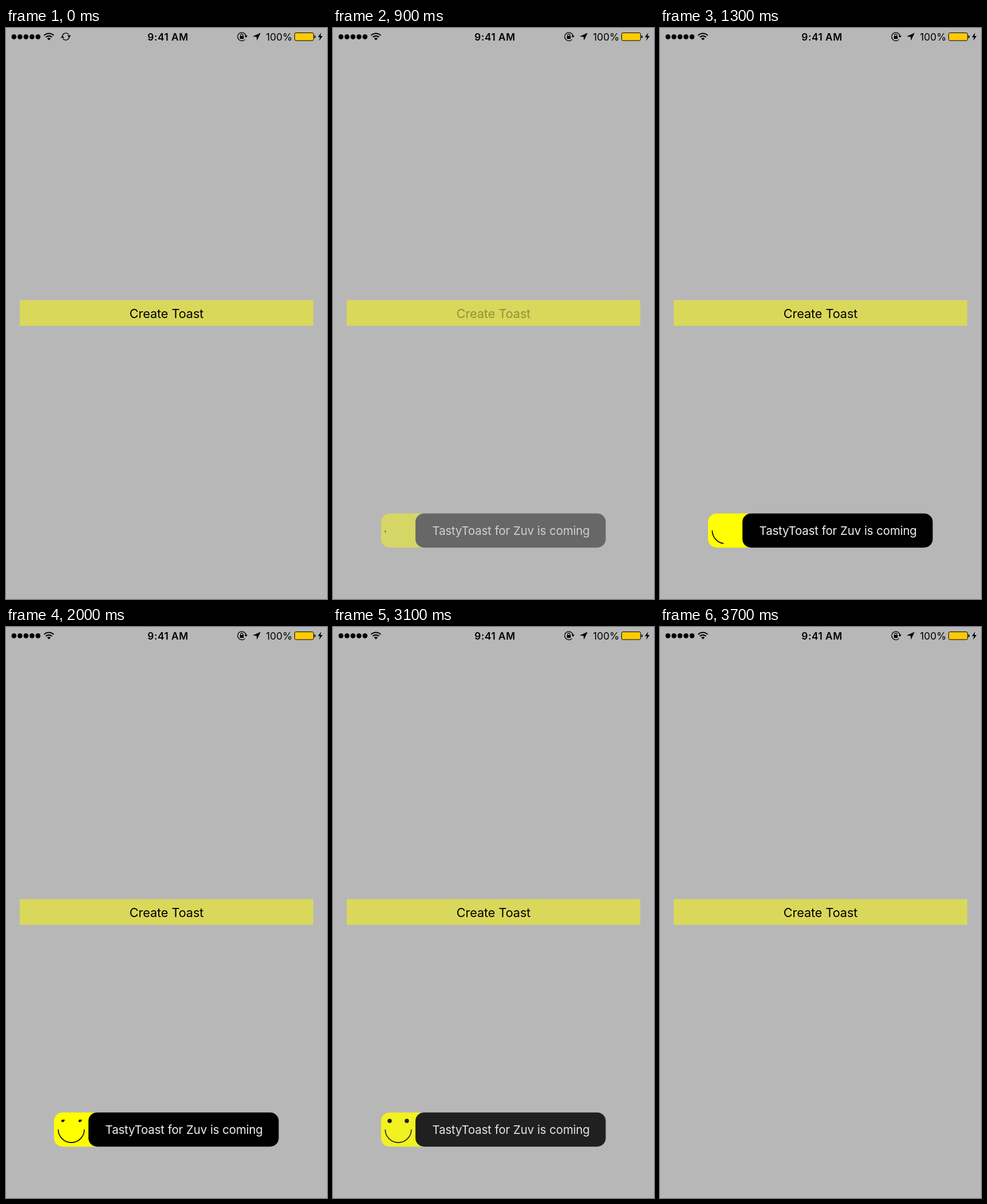
Recreate the animation shown at these times as an HTML page. Size 561 by 998 pixels, loop 4.5 s.

```html
<!DOCTYPE html>
<html lang="en">
<head>
<meta charset="utf-8">
<title>Toast demo</title>
<style>
  html, body { margin: 0; width: 100%; height: 100%; overflow: hidden; background: #b7b7b7; }
  svg { display: block; width: 100%; height: 100%; }
  text { font-family: Inter, "Liberation Sans", sans-serif; }
  .line { fill: none; stroke: #000; }
</style>
</head>
<body>
<svg viewBox="0 0 561 998">
  <rect width="561" height="998" fill="#b7b7b7"/>

  <g id="signal"></g>
  <g class="line" stroke-width="2.1">
    <path d="M66.6 13A11.8 11.8 0 0 1 83.4 13"/>
    <path d="M69.6 16.1A7.6 7.6 0 0 1 80.4 16.1"/>
  </g>
  <path d="M75 21.6L71.9 18.4A4.4 4.4 0 0 1 78.1 18.4Z"/>

  <g id="sync">
    <path class="line" stroke-width="1.4" d="M98.5 14.5A6.1 6.1 0 0 1 109.6 11.6M110.5 15.5A6.1 6.1 0 0 1 99.4 18.4"/>
    <path d="M95.6 17.2L98.6 13L101.8 17.2ZM107.2 12.8L110.4 17L113.4 12.8Z"/>
  </g>

  <text x="283" y="21.8" font-size="17.4" font-weight="600" letter-spacing=".45" text-anchor="middle">9:41 AM</text>

  <path class="line" stroke-width="1.3" d="M419.4 14A7.3 7.3 0 1 0 417.6 20.1"/>
  <path d="M416.6 13.6H422.2L419.4 17.1Z"/>
  <rect x="408.8" y="14" width="6.6" height="5" rx=".5"/>
  <path class="line" stroke-width="1.2" d="M410.1 14.4V12.6A2 2 0 0 1 414.1 12.6V14.4"/>
  <path d="M445 8.5L438.6 22L437.9 15.4L431 14.8Z"/>

  <text x="454.2" y="21.8" font-size="17.4">100%</text>
  <rect x="504.5" y="8.5" width="33" height="13.5" rx="2.2" fill="#fecb00" stroke="#000"/>
  <path d="M538.9 12.7Q541 13 541 15.4T538.9 18.1Z"/>
  <path d="M550.8 8.2L545 16.1H548.7L547.2 22.3L553.4 13.9H549.6Z"/>

  <rect x="24" y="475.6" width="513" height="44.9" fill="#dad85a"/>
  <text id="label" x="280.5" y="506.8" font-size="21.8" letter-spacing="-.13" text-anchor="middle">Create Toast</text>

  <g id="toast">
    <rect x="84" y="848.4" width="90" height="59.8" rx="15" fill="#ff0"/>
    <rect x="144.1" y="848.4" width="332.5" height="59.8" rx="15"/>
    <text x="173.6" y="886" font-size="20.5" letter-spacing="-.2" word-spacing=".4" fill="#f0f0f0">TastyToast for Zuv is coming</text>
    <path id="smile" class="line" stroke-width="1.6"/>
    <g id="eyes">
      <circle cx="99" cy="863.3" r="2.25"/>
      <circle cx="129" cy="863.3" r="2.25"/>
      <path id="rims" class="line" stroke-width="3"/>
    </g>
  </g>
</svg>
<script>
const LOOP = 4500, STEP = 100;
const el = id => document.getElementById(id);
const signal = el("signal"), sync = el("sync"), label = el("label"), toast = el("toast");
const smile = el("smile"), eyes = el("eyes"), rims = el("rims");

const ramp = (t, start, length) => Math.min(1, Math.max(0, (t - start) / length));
const ease = p => p * p * (3 - 2 * p);

// Counterclockwise arc, drawn in halves so a full turn works too
function arc(cx, cy, r, from, sweep) {
  const at = deg => {
    const a = deg * Math.PI / 180;
    return `${(cx + r * Math.cos(a)).toFixed(2)} ${(cy + r * Math.sin(a)).toFixed(2)}`;
  };
  const bend = `A${r} ${r} 0 0 0 `;
  return `M${at(from)}${bend}${at(from - sweep / 2)}${bend}${at(from - sweep)}`;
}

function draw(t) {
  sync.setAttribute("opacity", 1 - ramp(t, 0, 300));

  const pressed = t >= 700 && t < 1300;
  label.setAttribute("opacity", pressed ? 0.2 + 0.8 * ease(ramp(t, 790, 430)) : 1);

  const shown = ease(ramp(t, 764, 300)) * (1 - ease(ramp(t, 3020, 295)));
  toast.setAttribute("opacity", shown);

  const mouth = ramp(t, 850, 980);
  smile.setAttribute("d", mouth ? arc(114.1, 878.3, 22.8, 180, 180 * mouth) : "");

  const rim = 360 * ramp(t, 1870, 1020);
  eyes.setAttribute("visibility", rim ? "visible" : "hidden");
  rims.setAttribute("d", rim ? arc(99, 863.3, 2.25, 0, rim) + arc(129, 863.3, 2.25, 0, rim) : "");
}

for (let i = 0; i < 5; i++) {
  signal.innerHTML += `<circle cx="${13.9 + 10.5 * i}" cy="15.4" r="4.3"/>`;
}

// The picture advances ten times a second
const begin = performance.now();
function tick() {
  const t = (performance.now() - begin) % LOOP;
  draw(Math.floor(t / STEP) * STEP);
  requestAnimationFrame(tick);
}
tick();
</script>
</body>
</html>
```
